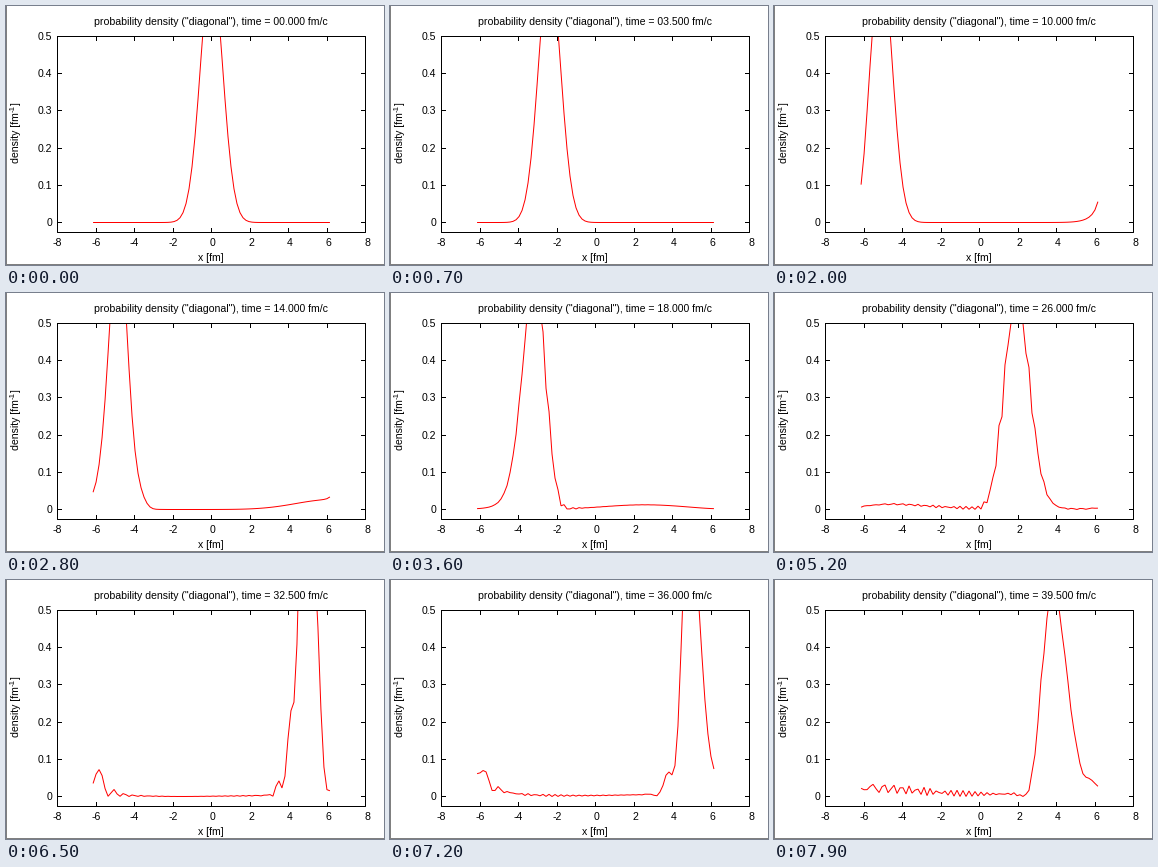
These frames come from a looping animation (378x259 px, 8 s). A matplotlib script:

```python
import numpy as np
import matplotlib.pyplot as plt
from matplotlib.animation import FuncAnimation
from matplotlib.patches import Rectangle

W, H, DPI = 378, 259, 64
FRAMES, INTERVAL, DT = 80, 100, 0.5
PX = 72 / DPI  # points per pixel
LEFT, RIGHT, TOP, BOTTOM = 51.5, 359.5, 30.5, 226.5

# Wave packet in a harmonic well on a periodic grid
N, BOX = 80, 12.46
OMEGA, SWING, WIDTH, HBAR_M = 0.1362, 5.21, 0.82, 0.0885

plt.rcParams["font.family"] = "Liberation Sans"


def px(x):
    return 205.5 + 19.25 * x


def py(d):
    return 216.5 - 372 * d


def crisp(p):
    """Centre of the pixel that holds p."""
    return np.floor(p) + 0.5


def solve():
    """Eigenmodes of the well and the packet's weight on each."""
    dx = BOX / N
    x = (np.arange(N) + 0.5) * dx - BOX / 2
    k = 2 * np.pi * np.fft.fftfreq(N, dx)
    kinetic = np.fft.ifft(
        (0.5 * HBAR_M * k**2)[:, None] * np.fft.fft(np.eye(N), axis=0), axis=0
    ).real
    well = np.diag(0.5 * OMEGA**2 * x**2 / HBAR_M)
    energy, modes = np.linalg.eigh(kinetic + well)
    k0 = SWING * OMEGA / HBAR_M
    psi = np.exp(-x**2 / (2 * WIDTH**2) - 1j * k0 * x)
    psi /= np.sqrt(np.sum(np.abs(psi) ** 2) * dx)
    return x, energy, modes, modes.T @ psi


x, energy, modes, weights = solve()


def density(t):
    return np.abs(modes @ (weights * np.exp(-1j * energy * t))) ** 2


fig = plt.figure(figsize=(W / DPI, H / DPI), dpi=DPI, facecolor="white")
ax = fig.add_axes([0, 0, 1, 1])
ax.set(xlim=(0, W), ylim=(H, 0))
ax.axis("off")


def line(xs, ys, color="black"):
    return ax.plot(xs, ys, color=color, lw=PX, solid_capstyle="butt",
                   solid_joinstyle="miter", snap=False)[0]


def label(x, y, s, ha="center", size=10.5, rotation=0):
    return ax.text(x, y, s, ha=ha, va="baseline", fontsize=size * PX,
                   rotation=rotation, rotation_mode="anchor")


# Page edge
line([0.5, 0.5], [0, H], "#808080")
line([0, W], [258.5, 258.5], "#808080")

curve = line([], [], "red")
curve.set_clip_path(Rectangle((LEFT, TOP), RIGHT - LEFT, BOTTOM - TOP,
                              transform=ax.transData))

# Frame, ticks and tick labels
line([LEFT, RIGHT, RIGHT, LEFT, LEFT], [TOP, TOP, BOTTOM, BOTTOM, TOP])
for v in range(-8, 9, 2):
    p = crisp(px(v))
    line([p, p], [BOTTOM, BOTTOM - 4.5])
    line([p, p], [TOP, TOP + 4.5])
    label(px(v) + (1.5 if v >= 0 else 0), 240.5, str(v))
for i in range(6):
    p = crisp(py(i / 10))
    line([LEFT, LEFT + 4.5], [p, p])
    line([RIGHT, RIGHT - 4.5], [p, p])
    label(46, p + 3.5, f"{i / 10:g}", ha="right")

label(205, 255, "x [fm]")
label(13, 157, "density [fm", ha="left", rotation=90)
label(8.5, 106, "-1", ha="left", size=8, rotation=90)
label(13, 99, "]", ha="left", rotation=90)
title = label(88, 19, "", ha="left")


def update(i):
    t = i * DT
    curve.set_data(px(x), py(density(t)))
    title.set_text(f'probability density ("diagonal"), time = {t:06.3f} fm/c')
    return curve, title


anim = FuncAnimation(fig, update, frames=FRAMES, interval=INTERVAL,
                     repeat=True, repeat_delay=0)
plt.show()
```
